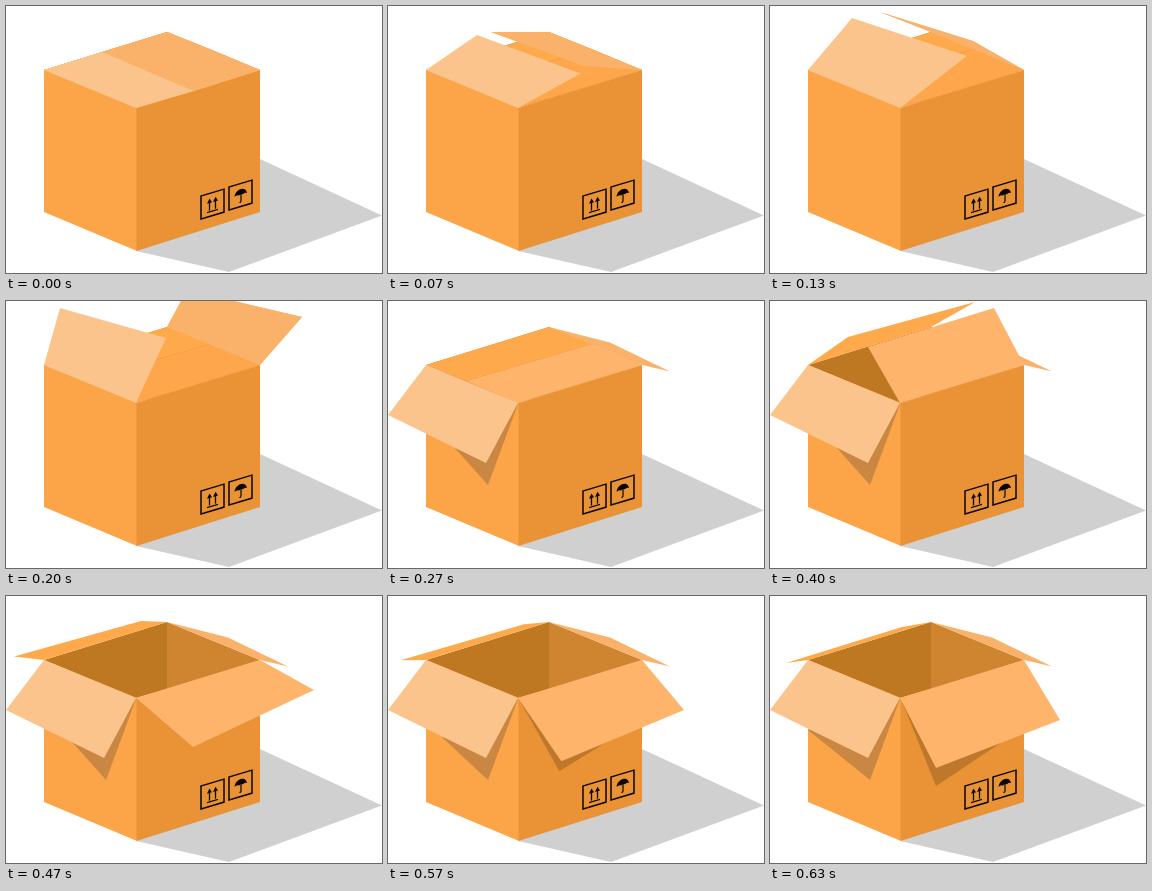
An HTML page for the animation above (1130 ms loop, 376 px wide and 267 px high).

```html
<!DOCTYPE html>
<html lang="en">
<head>
<meta charset="utf-8">
<title>Opening box</title>
<style>
html, body { margin: 0; width: 100%; height: 100%; overflow: hidden; background: #fff; }
svg { display: block; width: 376px; height: 267px; }

.move { animation: 1130ms step-end infinite; }
.left { fill: #fcc48d; animation-name: left; }
.back { fill: #fab26a; animation-name: back; }
.over { animation-name: back, lower; }
.rear { fill: #fea94b; animation-name: rear; }
.front { fill: #fda64b; animation-name: front, tint; }
.left-shade { fill: #c98743; animation-name: left-shade; }
.front-shade { fill: #bd782b; animation-name: front-shade; }

/* Hinge corners come first, then the two free corners. */
@keyframes left {
  0% { d: path("M38 64L130 102L188 85L96 46Z"); animation-timing-function: steps(4); }
  11.5% { d: path("M38 64L130 102L197 50L82 12Z"); }
  15.04% { d: path("M38 64L130 102L180 41L69 7Z"); }
  17.69% { d: path("M38 64L130 102L160 37L54 7Z"); }
  20.35% { d: path("M38 64L130 102L82 88L-8 48Z"); }
  23.89%, 100% { d: path("M38 64L130 102L98 162L0 114Z"); }
}
@keyframes back {
  0% { d: path("M161 26L254 64L188 85L96 46Z"); animation-timing-function: steps(4); }
  11.5% { d: path("M161 26L254 64L203 35L110 6Z"); }
  15.04% { d: path("M161 26L254 64L247 13L146 -11Z"); }
  17.69% { d: path("M161 26L254 64L296 16L181 -11Z"); }
  20.35% { d: path("M161 26L254 64L300 44L212 9Z"); }
  23.89%, 100% { d: path("M161 26L254 64L282 70.5L222 41.5Z"); }
}
@keyframes lower {
  0% { visibility: visible; }
  23.89%, 100% { visibility: hidden; }
}
@keyframes rear {
  0%, 29.2% { d: path("M38 64L161 26L204 43L78 80Z"); }
  29.2% { animation-timing-function: steps(2); }
  35.39% { d: path("M38 64L161 26L205 1L78 36Z"); }
  38.05% { d: path("M38 64L161 26L172 -10L46 26Z"); }
  41.59% { d: path("M38 64L161 26L135 25L8 60.5Z"); }
  46.9% { d: path("M38 64L161 26L138 27L11 63Z"); animation-timing-function: steps(3); }
  55.75%, 100% { d: path("M38 64L161 26L132 31L16 67Z"); }
}
@keyframes front {
  0%, 29.2% { d: path("M130 102L254 64L204 43L78 80Z"); }
  29.2% { animation-timing-function: steps(2); }
  35.39% { d: path("M130 102L254 64L224 7L98 46Z"); }
  38.05% { d: path("M130 102L254 64L296 21L170 62Z"); }
  41.59% { d: path("M130 102L254 64L308 94L187 151Z"); }
  46.9% { d: path("M130 102L254 64L299 109L177 162Z"); animation-timing-function: steps(3); }
  55.75%, 100% { d: path("M130 102L254 64L290 124L166 172Z"); }
}
@keyframes tint {
  0% { fill: #fda64b; }
  20.35% { fill: #feac5a; }
  23.89%, 100% { fill: #ffb46c; }
}
@keyframes left-shade {
  0% { d: path("M130 103L130 103L130 103Z"); }
  23.89% { d: path("M130 103L100 184L66 146Z"); }
  46.9% { d: path("M130 103L100 184L62 145Z"); animation-timing-function: steps(3); }
  55.75%, 100% { d: path("M130 103L100 184L38 134Z"); }
}
@keyframes front-shade {
  0% { d: path("M131 103L131 103L131 103Z"); }
  46.9% { d: path("M131 103L174 168L210 147Z"); animation-timing-function: steps(3); }
  55.75%, 100% { d: path("M131 103L166 190L232 146Z"); }
}
</style>
</head>
<body>
<svg viewBox="0 0 376 267">
  <path fill="#d0d0d0" d="M254 153L376 209.5L223 266L130 245Z"/>

  <!-- inside walls -->
  <path fill="#bf7822" d="M38 64L161 26V93L130 102Z"/>
  <path fill="#cf842f" d="M161 26L254 64L161 93Z"/>

  <!-- outside faces -->
  <path fill="#fba548" d="M38 64L131 102V245L38 206Z"/>
  <path fill="#e99336" d="M130.5 102L254 64V206L130.5 245Z"/>

  <g fill="none" stroke="#0a0500" stroke-width="1.5">
    <g transform="matrix(1 -.3 0 1 195 190)">
      <path d="M0 0H23V23H0Z"/>
      <path stroke-width="1.3" d="M8.5 8V17M14.5 8V17M6 18.5H17"/>
      <path fill="#0a0500" stroke="none" d="M8.5 5L11 9.5H6ZM14.5 5L17 9.5H12Z"/>
    </g>
    <g transform="matrix(1 -.3 0 1 223 181)">
      <path d="M0 0H23V23H0Z"/>
      <path fill="#0a0500" stroke="none" d="M5.5 11.5C6.5 3.5 17 3.5 18 11.5Q16 10 14 11.5Q12 10 10 11.5Q8 10 5.5 11.5Z"/>
      <path stroke-width="1.2" d="M12 10V17.5Q12 19 10.5 18.5"/>
    </g>
  </g>

  <path class="move left-shade"/>
  <path class="move front-shade"/>
  <path class="move back"/>
  <path class="move rear"/>
  <path class="move front"/>
  <path class="move back over"/>
  <path class="move left"/>
</svg>
</body>
</html>
```
